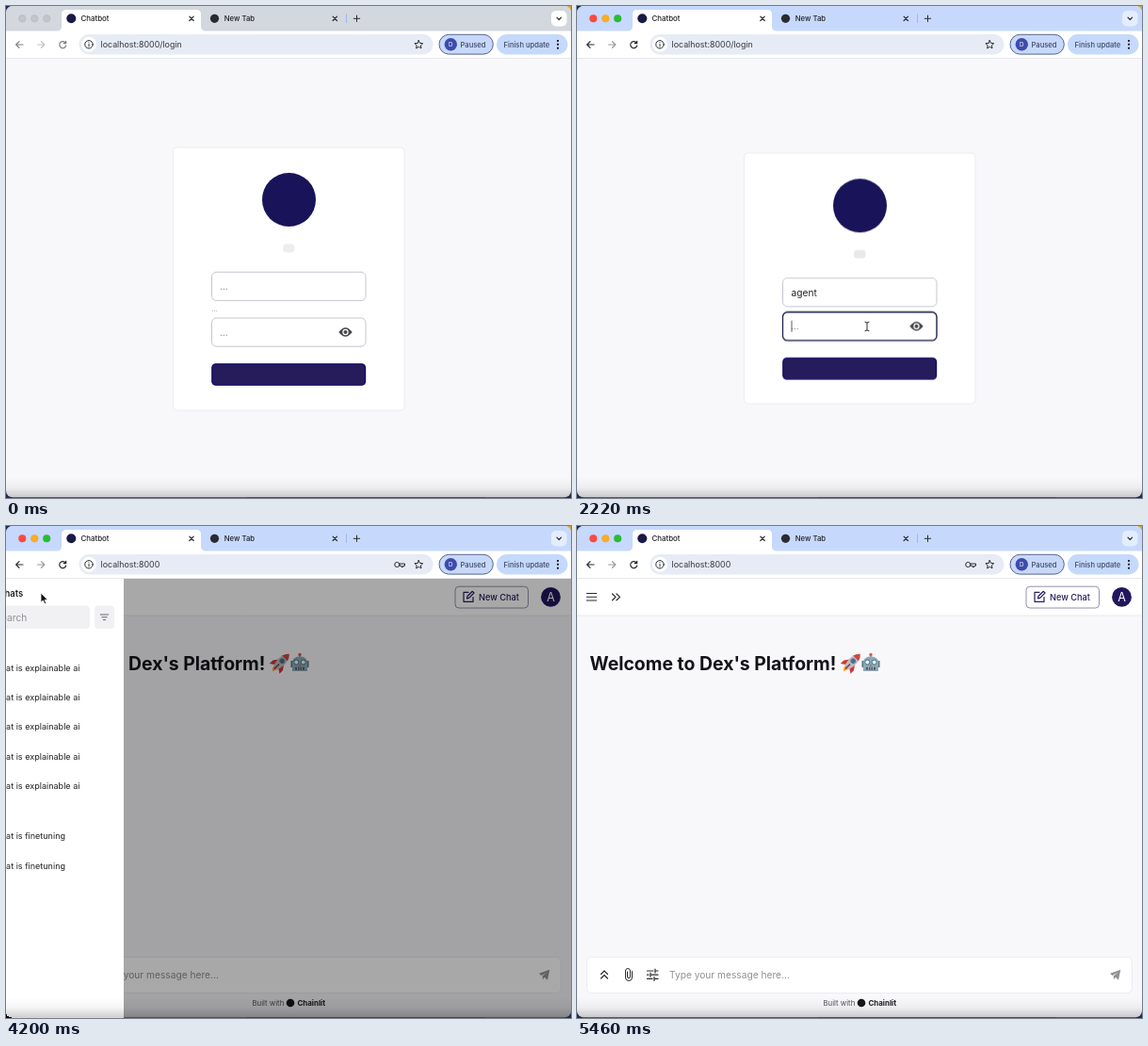
Recreate the animation shown at these times as an HTML page. Size 600 px wide and 522 px high, loop 5.64 s.

```html
<!DOCTYPE html>
<html lang="en">
<head>
<meta charset="utf-8">
<title>Chatbot</title>
<style>
html, body { margin: 0; width: 100%; height: 100%; overflow: hidden; background: #1d2c50; }
svg { display: block; width: 100%; height: 100%; }
text { font-family: Inter, Roboto, sans-serif; fill: #1f2024; white-space: pre; }
.line { fill: none; stroke: #2b2c30; stroke-width: 1.2; stroke-linecap: round; stroke-linejoin: round; }
.thin { stroke-width: 1; }
.dim { stroke: #9a9ca3; }
.small { font-size: 7.7px; font-weight: 500; }
.pill { font-size: 7.6px; fill: #3c4763; }
.ten { font-size: 10.2px; }
.hint { fill: #8e8e96; }
.row { font-size: 9.05px; }
.field { fill: #fff; stroke: #c6c6cf; }
.focus { fill: none; stroke: #1d1f4a; stroke-width: 1.3; }
.caret { stroke: #333; stroke-width: .8; }

/* Hard switches: every state holds until the next key. */
.hard { animation: 5640ms step-end infinite; }
.bar { animation-name: bar; }
.menu { animation-name: menu; }
.wake { animation-name: wake; }
.lights { animation-name: come-lights; }
.login { animation-name: leave; }
.chat { animation-name: arrive; }
.untouched { animation-name: touched; }
.card { animation-name: shrink; }
.upper { animation-name: sink; }
.lower { animation-name: rise; }
.hover1 { animation-name: hover1; }
.focus1 { animation-name: focus1; }
.caret1 { animation-name: caret1; }
.focus2 { animation-name: focus2; }
.caret2 { animation-name: caret2; }
.empty2 { animation-name: filled2; }
.caret3 { animation-name: caret3; }
.arrow { animation-name: arrow; }
.beam { animation-name: beam; }
@keyframes bar { 0% { fill: #d3d7de } 5% { fill: #c6d9fd } }
@keyframes menu { 0% { fill: #fff } 5% { fill: #e4edfe } }
@keyframes wake { 0% { opacity: .6 } 5% { opacity: 1 } }
@keyframes come-lights { 0% { opacity: 0 } 5% { opacity: 1 } }
@keyframes leave { 58.5% { opacity: 0 } }
@keyframes arrive { 0% { opacity: 0 } 58.5% { opacity: 1 } }
@keyframes touched { 20.2% { opacity: 0 } }
@keyframes shrink { 20.2% { y: 156px; height: 266px } }
@keyframes sink { 20.2% { transform: translateY(6.3px) } }
@keyframes rise { 20.2% { transform: translateY(-6.3px) } }
@keyframes hover1 { 0% { opacity: 0 } 10.6% { opacity: 1 } 16% { opacity: 0 } }
@keyframes focus1 { 0% { opacity: 0 } 16% { opacity: 1 } 37.2% { opacity: 0 } }
@keyframes caret1 { 0% { opacity: 0 } 16% { opacity: 1 } 20.2% { opacity: 0 } }
@keyframes focus2 { 0% { opacity: 0 } 37.2% { opacity: 1 } }
@keyframes caret2 { 0% { opacity: 0 } 37.2% { opacity: 1 } 42.5% { opacity: 0 } }
@keyframes filled2 { 43% { opacity: 0 } }
@keyframes caret3 { 0% { opacity: 0 } 62.7% { opacity: 1 } 68.1% { opacity: 0 } }
@keyframes arrow { 10.6% { opacity: 0 } 58.5% { opacity: 1 } 92.5% { opacity: 0 } }
@keyframes beam { 0% { opacity: 0 } 10.6% { opacity: 1 } 20.2% { opacity: 0 } 30% { opacity: 1 } 42.5% { opacity: 0 } }

/* Typed characters appear one after another. */
.typed tspan { visibility: hidden; animation: key 5640ms step-end infinite; animation-delay: calc(var(--from) + var(--i) * 88ms); }
@keyframes key { 0% { visibility: visible } 50% { visibility: hidden } }

/* Smooth motion. */
.pulse { animation: pulse 1880ms ease-in-out infinite; }
@keyframes pulse { 0%, 100% { opacity: .5 } 50% { opacity: 1 } }
.drawer { animation: drawer 5640ms linear infinite; }
@keyframes drawer {
  0%, 73.5% { transform: translateX(-167px) }
  74.4%, 75.4% { transform: translateX(-41px) }
  75.6% { transform: translateX(-9px) }
  76.6%, 86.3% { transform: none }
  87.15%, 88.2% { transform: translateX(-160px) }
  88.3%, 100% { transform: translateX(-167px) }
}
.shade { animation: shade 5640ms linear infinite; }
@keyframes shade {
  0%, 73.5% { opacity: 0 }
  74.4%, 75.4% { opacity: .34 }
  76.6%, 88.2% { opacity: .59 }
  90.4%, 100% { opacity: 0 }
}
.mouse { animation: mouse 5640ms ease-in-out infinite; }
@keyframes mouse {
  0% { transform: translate(612px, 420px) }
  4.3% { transform: translate(420px, 335px) }
  13.8%, 30% { transform: translate(334px, 294px) }
  36.2%, 58.5% { transform: translate(308px, 340px) }
  64%, 65.9% { transform: translate(-6px, 73px) }
  72.3%, 76.2% { transform: translate(37px, 71px) }
  84%, 88.3% { transform: translate(214px, 179px) }
  92.5%, 100% { transform: translate(560px, -24px) }
}
</style>
</head>
<body>
<svg viewBox="0 0 600 522">
  <defs>
    <clipPath id="window"><rect width="600" height="521.3" rx="7"/></clipPath>
    <linearGradient id="fade" x2="0" y2="1">
      <stop offset="0" stop-opacity="0"/>
      <stop offset=".5" stop-opacity=".04"/>
      <stop offset="1" stop-opacity=".2"/>
    </linearGradient>
    <path id="x" class="line" d="M-2.2-2.2 2.2 2.2M2.2-2.2-2.2 2.2"/>
    <path id="bubble" class="line thin" d="M-4-4H4V2.500H-1.800L-4 4.500Z"/>
    <path id="dots" d="M0-4.800a.95.95 0 1 0 .01 0M0-.95a.95.95 0 1 0 .01 0M0 2.900a.95.95 0 1 0 .01 0"/>
  </defs>
  <rect width="600" height="522" fill="#1d2c50"/>
  <rect x="592" width="8" height="8" fill="#d9a441"/>

  <g clip-path="url(#window)">
    <rect width="600" height="522" fill="#f8f7fa"/>

    <!-- login page -->
    <g class="hard login">
      <rect class="hard card" x="177.500" y="150" width="245.500" height="279" rx="4" fill="#fff" stroke="#ececf0"/>
      <g class="hard upper">
        <circle cx="300.500" cy="205.500" r="28.500" fill="#19135a"/>
        <rect class="pulse" x="294" y="252.500" width="12.500" height="9" rx="4" fill="#dcdcdf"/>
        <rect class="field" x="218.500" y="282.300" width="163.500" height="30.300" rx="5"/>
        <rect class="field hard hover1" x="218.500" y="282.300" width="163.500" height="30.300" rx="5" style="stroke:#5c5c64"/>
        <rect class="focus hard focus1" x="218.500" y="282.300" width="163.500" height="30.300" rx="5"/>
        <text class="ten hint hard untouched" x="227" y="301">...</text>
        <text class="typed" x="227.500" y="301.300" font-size="10.200" style="--from:1140ms"><tspan style="--i:0">a</tspan><tspan style="--i:1">g</tspan><tspan style="--i:2">e</tspan><tspan style="--i:3">n</tspan><tspan style="--i:4">t</tspan></text>
        <path class="caret hard caret1" d="M228 291.500v12"/>
      </g>
      <text class="hard untouched" x="218.500" y="324.300" font-size="7.500" style="fill:#66666e">...</text>
      <g class="hard lower">
        <rect class="field" x="218.500" y="331" width="163.500" height="30.200" rx="5"/>
        <rect class="focus hard focus2" x="218.500" y="331" width="163.500" height="30.200" rx="5"/>
        <text class="ten hint hard empty2" x="227" y="349.700">...</text>
        <text class="typed" x="227.500" y="349.800" font-size="10.200" style="--from:2430ms"><tspan style="--i:0">•</tspan><tspan style="--i:1">•</tspan><tspan style="--i:2">•</tspan><tspan style="--i:3">•</tspan><tspan style="--i:4">•</tspan></text>
        <path class="caret hard caret2" d="M228 340v12"/>
        <path d="M353.300 346Q360.500 336.600 367.700 346 360.500 355.400 353.300 346Z" fill="#48484d"/>
        <circle cx="360.500" cy="346" r="3.200" fill="#fff"/>
        <circle cx="360.500" cy="346" r="2" fill="#48484d"/>
        <rect x="218.800" y="379.800" width="162.800" height="22.400" rx="4" fill="#261c5c" stroke="#110a66" stroke-width="1.200"/>
      </g>
    </g>

    <!-- chat page -->
    <g class="hard chat">
      <rect y="56" width="600" height="39" fill="#fff"/>
      <path d="M0 95H600" stroke="#e9e9ee"/>
      <path class="line thin" d="M10.300 71.500H20.700M10.300 75.300H20.700M10.300 79H20.700"/>
      <path class="line" d="M37.500 72 41 75.400 37.500 78.800M42 72 45.500 75.400 42 78.800"/>
      <rect x="477" y="64.200" width="77.500" height="22.800" rx="4" fill="#fff" stroke="#9292ab"/>
      <path class="line" d="M491 70.300H486V80.300H496V75.500M489.500 76.800 490 74.500 495.300 69.300 497 71 491.700 76.300Z" style="stroke:#241b5c"/>
      <text x="502" y="78.700" font-size="9.200" font-weight="500" style="fill:#241b5c">New Chat</text>
      <circle cx="578.500" cy="75.400" r="10.400" fill="#22175e"/>
      <text x="578.500" y="79.800" font-size="12.500" text-anchor="middle" style="fill:#fff">A</text>
      <text x="13.500" y="152.500" font-size="19.400" font-weight="700" style="fill:#131418">Welcome to Dex's Platform!</text>

      <!-- rocket -->
      <g transform="translate(291.500 145) rotate(45)">
        <path d="M-2.500 7Q0 17 2.500 7Z" fill="#f59a1c"/>
        <path d="M-4-1-7.500 4V9L-3 6ZM4-1 7.500 4V9L3 6Z" fill="#c93a36"/>
        <path d="M0-13Q5-8 4.500 0L3 7.500H-3L-4.500 0Q-5-8 0-13Z" fill="#b7bdc6"/>
        <path d="M0-13Q3-10.500 4-6.500H-4Q-3-10.500 0-13Z" fill="#d0453c"/>
        <circle cy="-2.500" r="2.300" fill="#3f6f95" stroke="#6c747e"/>
        <path d="M0 2V9" stroke="#a62f2d" stroke-width="1.500"/>
      </g>
      <!-- robot -->
      <g transform="translate(312 145)">
        <path d="M0-5V-9" stroke="#7e8f9d" stroke-width="1.500"/>
        <circle cy="-8.500" r="1.700" fill="#d85a45"/>
        <path d="M-9.500-2h3v7h-3zM6.500-2h3v7h-3z" fill="#5f7380"/>
        <path d="M-8 9V-1Q-7-6.500 0-6.500T8-1V9Z" fill="#8fa8b6"/>
        <circle cx="-3.700" cy="-.5" r="2.500" fill="#e5fbff" stroke="#3b7685"/>
        <circle cx="3.700" cy="-.5" r="2.500" fill="#e5fbff" stroke="#3b7685"/>
        <path d="M0 1.300 1.300 3.500H-1.300Z" fill="#c7584a"/>
        <rect x="-5" y="4.700" width="10" height="3" rx="1" fill="#4a5962"/>
        <path d="M-2.500 4.700v3M0 4.700v3M2.500 4.700v3" stroke="#d6e0e5" stroke-width=".7"/>
      </g>

      <rect x="10.500" y="457.500" width="579" height="38" rx="5" fill="#fff" stroke="#ececf0"/>
      <path class="line" d="M25.500 475.500 29 472 32.500 475.500M25.500 480 29 476.500 32.500 480"/>
      <path class="line thin" d="M58.500 472.500V479Q58.500 482.500 55 482.500T51.500 479V472Q51.500 469.500 54 469.500T56.500 472V478Q56.500 479.700 55 479.700T53.500 478V473"/>
      <path class="line" d="M74.500 472H81M84 472H86M83 470V474M74.500 476.200H76M79 476.200H86M78 474.200V478.200M74.500 480.400H80M83 480.400H86M82 478.400V482.400"/>
      <text class="ten hint" x="98" y="479.600">Type your message here...</text>
      <path class="caret hard caret3" d="M98.300 470v13"/>
      <path d="M566 474.800 577.300 470.800 575 481.700 571.800 478.800 570 481.300 569.700 477.500 574.500 473.500 568.500 476.900Z" fill="#919197"/>
      <text x="261.500" y="508.800" font-size="7.800" style="fill:#55555b">Built with</text>
      <circle cx="302" cy="506" r="4.300" fill="#17171a"/>
      <text x="309.500" y="508.800" font-size="7.900" font-weight="700">Chainlit</text>

      <rect class="shade" y="56" width="600" height="466" fill="#000"/>
      <g class="drawer">
        <rect y="56" width="166" height="466" fill="#fff"/>
        <text x="10" y="74.900" font-size="9.500" font-weight="600">Past Chats</text>
        <rect x="10" y="84.500" width="120" height="24.500" rx="4" fill="#f1f1f4"/>
        <circle class="line dim" cx="20" cy="96" r="3"/>
        <path class="line dim" d="M22.300 98.300 24.500 100.500"/>
        <text class="hint" x="29.500" y="100.500" font-size="10.200">Search</text>
        <rect x="135" y="84.500" width="21" height="24.500" rx="4" fill="#f1f1f4"/>
        <path class="line thin" d="M141.300 94H149.700M142.800 96.800H148.200M144.300 99.600H146.700" style="stroke:#66666d"/>
        <g id="threads"></g>
      </g>
    </g>
    <rect y="500" width="600" height="22" fill="url(#fade)"/>

    <!-- browser -->
    <rect class="hard bar" width="600" height="40" fill="#c6d9fd"/>
    <path d="M0 26.500H54Q59 26.500 59 21.500V9Q59 4 64 4H202Q207 4 207 9V21.500Q207 26.500 212 26.500H600V55H0Z" fill="#fff"/>
    <path d="M0 55.500H600" stroke="#e6e7ec"/>
    <g fill="#c2c5cb" stroke="#b2b5bb" stroke-width=".6">
      <circle cx="17.300" cy="13.300" r="3.700"/><circle cx="30.300" cy="13.300" r="3.700"/><circle cx="43.200" cy="13.300" r="3.700"/>
    </g>
    <g class="hard lights">
      <circle cx="17.300" cy="13.300" r="4" fill="#fb4a40"/><circle cx="30.300" cy="13.300" r="4" fill="#f8ad25"/><circle cx="43.200" cy="13.300" r="4" fill="#27bd35"/>
    </g>
    <circle cx="69.300" cy="13.300" r="5" fill="#1a1a48"/>
    <text class="small" x="79.500" y="16" style="font-size:7.9px">Chatbot</text>
    <use href="#x" x="197" y="13.300"/>
    <circle cx="221.500" cy="13.300" r="4.600" fill="#2a2b30"/>
    <text class="small" x="231.800" y="16">New Tab</text>
    <use href="#x" x="349.300" y="13.300"/>
    <path d="M361.500 8.500V18" stroke="#9db7e8"/>
    <path class="line thin" d="M369.300 13.300H375.700M372.500 10.100V16.500"/>
    <rect class="hard menu" x="579" y="5" width="16.500" height="16.500" rx="5" fill="#e4edfe"/>
    <path class="line" d="M585 12.200 587.300 14.500 589.600 12.200"/>

    <g class="hard wake">
      <path class="line" d="M18 41H10.800M14 37.700 10.700 41 14 44.300"/>
      <path class="line dim" d="M33.500 41H40.800M37.500 37.700 40.900 41 37.500 44.300"/>
      <path class="line" d="M63.300 39.300A3.500 3.500 0 1 0 63.700 42M63.700 37.300V39.700H61.300"/>
    </g>
    <rect x="77.500" y="30" width="376" height="21.500" rx="10.700" fill="#e7ebf5"/>
    <circle cx="88" cy="40.800" r="8" fill="#fff"/>
    <circle class="line thin" cx="88" cy="40.800" r="4.200"/>
    <path class="line thin" d="M88 40.500V43M88 38.700V38.800"/>
    <text x="100.500" y="44" font-size="8.900" style="fill:#35373d">localhost:8000<tspan id="path">/login</tspan></text>
    <g class="hard chat">
      <circle class="line thin" cx="415.300" cy="41" r="2.600"/>
      <path class="line thin" d="M418 40H423.500V42.200H421.800V43.500H420V42.200H418"/>
    </g>
    <path class="line thin" d="M438.300 36.500 439.600 39.400 442.700 39.700 440.400 41.800 441 44.900 438.300 43.300 435.600 44.900 436.200 41.800 433.900 39.700 437 39.400Z"/>
    <rect x="460" y="30.300" width="57.300" height="20.800" rx="10.400" fill="#c7d8fb" stroke="#56648f"/>
    <circle cx="472.300" cy="40.800" r="6.700" fill="#3d4bae"/>
    <text x="472.300" y="43.100" font-size="6.300" text-anchor="middle" style="fill:#fff">D</text>
    <text class="small pill" x="482.500" y="43.500">Paused</text>
    <rect x="521" y="30" width="75.500" height="21.400" rx="10.700" fill="#c5d9fd"/>
    <text class="small pill" x="528.500" y="43.500">Finish update</text>
    <use href="#dots" x="586" y="40.800"/>

    <g class="mouse">
      <path class="hard arrow" d="M0 0V10.200L2.400 8 4 11.600 5.700 10.900 4.100 7.400H7.300Z" fill="#111" stroke="#fff" stroke-width=".8"/>
      <path class="line thin hard beam" d="M-2-4.800Q0-4.800 0-3.500 0-4.800 2-4.800M0-3.500V3.500M-2 4.800Q0 4.800 0 3.500 0 4.800 2 4.800"/>
    </g>
  </g>
</svg>
<script>
// The address ending leaves together with the login page.
const path = document.getElementById("path");
const setPath = () => {
  const time = performance.now() % 5640;
  const shown = time < 3300 ? "/login" : "";
  if (path.textContent !== shown) path.textContent = shown;
  requestAnimationFrame(setPath);
};
setPath();

const thread = (topic, y) =>
  `<use href="#bubble" x="16" y="${y - 3}"/><text class="row" x="26.800" y="${y}">What is ${topic}</text>`;
const rows = (topic, count, top) =>
  Array.from({ length: count }, (_, i) => thread(topic, top + i * 31.4)).join("");
document.getElementById("threads").innerHTML =
  rows("explainable ai", 5, 153.6) + rows("finetuning", 2, 332.4);
</script>
</body>
</html>
```
